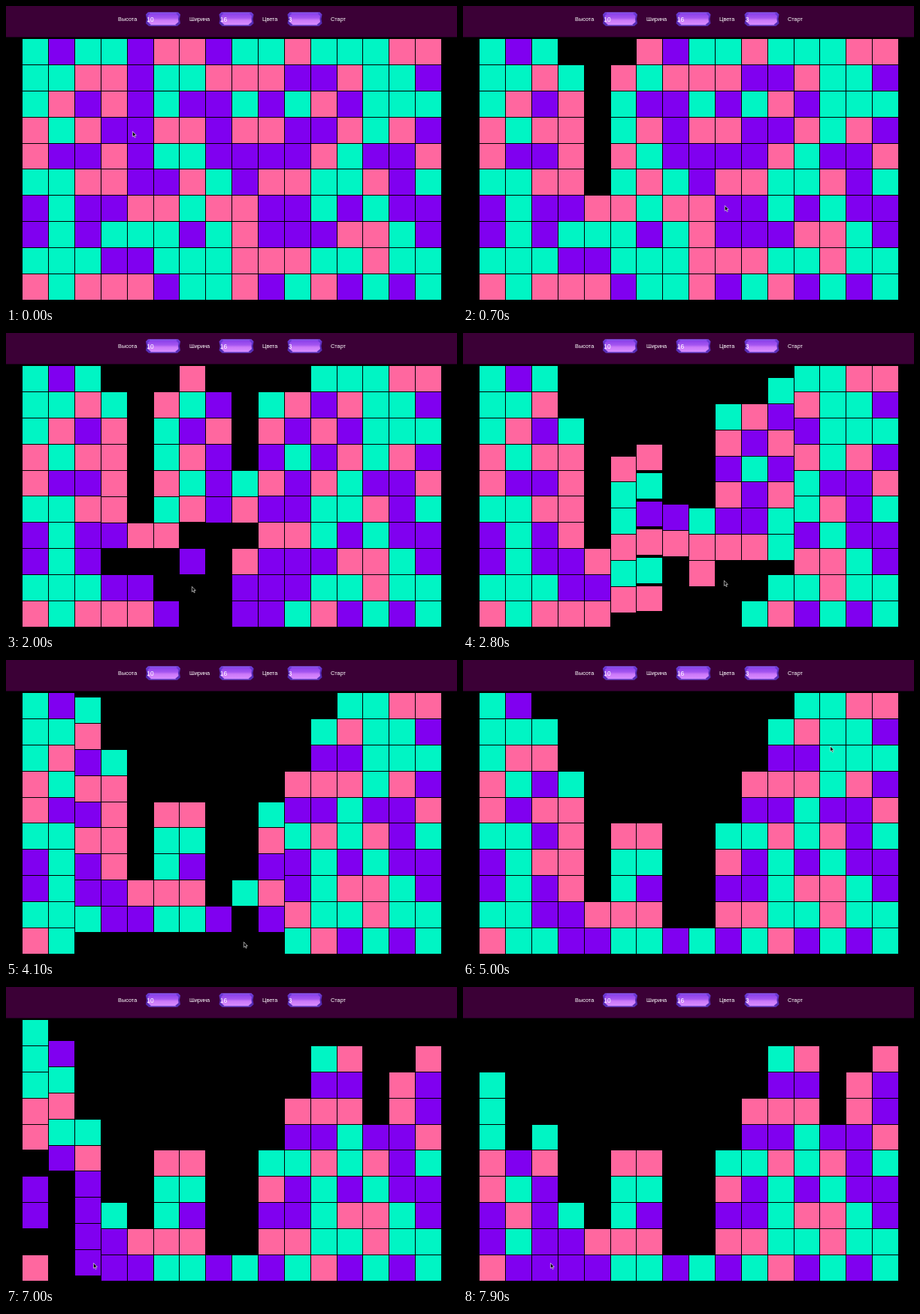
Write an HTML page that moves like this. It is 600x399 px and loops after 8000 ms.

```html
<!DOCTYPE html>
<html lang="ru">
<head>
<meta charset="utf-8">
<style>
  html, body { margin: 0; width: 100%; height: 100%; overflow: hidden; background: #000; }
  svg { display: block; width: 600px; height: 399px; }
  text { font-family: "Liberation Sans", Arial, sans-serif; fill: #fff; }
  .label { font-size: 7.35px; }
  .value { font-size: 8.4px; }
</style>
</head>
<body>
<svg viewBox="0 0 600 399">
  <defs>
    <linearGradient id="rim" x2="0" y2="1">
      <stop offset="0" stop-color="#7440e0"/>
      <stop offset=".5" stop-color="#4f26b0"/>
      <stop offset="1" stop-color="#5a30b8"/>
    </linearGradient>
    <linearGradient id="gem" x2="0" y2="1">
      <stop offset="0" stop-color="#8a40ea"/>
      <stop offset=".4" stop-color="#a455f0"/>
      <stop offset=".6" stop-color="#cb78f8"/>
      <stop offset="1" stop-color="#d88cff"/>
    </linearGradient>
    <g id="field">
      <path d="M3 0H43L46 3L45 9L46 15L42 18.5H4L0 15L1 9L0 3Z" fill="url(#rim)"/>
      <path d="M6 1.6H40L43.5 5L43 9L43.5 13L39 16.6H7L2.5 13L3 9L2.5 5Z" fill="url(#gem)"/>
      <path d="M5 .9H41M6 17.4H40" stroke="#b488ff" stroke-width=".7" opacity=".7"/>
    </g>
  </defs>
  <rect width="600" height="399"/>
  <rect width="600" height="41.5" fill="#3b0036"/>
  <g id="header"></g>
  <g id="board" shape-rendering="crispEdges"></g>
  <path id="cursor" d="M.4 .4V7.4L2 6L3.2 8.6L4.3 8.1L3.1 5.5H5.3Z" fill="#000" stroke="#fff" stroke-width=".6"/>
</svg>
<script>
const LOOP = 8000, STEP = 100;
const CELL = 34.86, LEFT = 21.8, TOP = 43.6;
const SPEED = 0.187 / CELL; // rows per ms
const COLORS = { T: '#00f5c4', V: '#8000f0', P: '#ff679f' };
const ROWS = [
  'TVTTVPPVTTPTTTPP',
  'TTPPVTTPPPVVPTTV',
  'TPVPVTVVTVTPVTTT',
  'PTPVVPPVPPVVPTPV',
  'PVVPVTTVVVVPTVVP',
  'TTPPVVPTVPPTTPVT',
  'VTVVPPTPPVVTVTVV',
  'VTVTTTVTPVVVPPTV',
  'TTTVVTTTPPPTTPTT',
  'PTPPPVTTPVTPVTVT'
];
// time, row, column
const CLICKS = [
  [512, 3, 4], [1250, 8, 8], [1998, 8, 6], [2715, 8, 9],
  [4068, 9, 8], [5200, 1, 13], [6230, 6, 3], [6850, 9, 2]
];
// time, x, y
const POINTER = [
  [0, 168, 167], [512, 168, 167], [700, 348, 266], [1100, 318, 338], [1260, 318, 338],
  [1750, 247, 338], [2050, 247, 338], [2600, 347, 330], [2850, 347, 330],
  [3900, 316, 376], [4200, 316, 376], [5050, 490, 112], [5300, 490, 112],
  [6100, 145, 264], [6300, 145, 264], [6750, 116, 368], [8000, 116, 368]
];

function add(parent, name, attrs, text = '') {
  const el = document.createElementNS('http://www.w3.org/2000/svg', name);
  for (const key in attrs) el.setAttribute(key, attrs[key]);
  el.textContent = text;
  return parent.appendChild(el);
}

// start and length of a tile along one axis, leaving a one-pixel grid line
function span(edge) {
  const start = Math.floor(edge) + 1;
  return [start, Math.floor(edge + CELL) - start];
}

const header = document.getElementById('header');
[['Высота', 149], ['Ширина', 244], ['Цвета', 341], ['Старт', 432]].forEach(([text, x]) =>
  add(header, 'text', { x, y: 20, class: 'label' }, text));
[['10', 186], ['16', 283.5], ['3', 374.5]].forEach(([text, x]) => {
  add(header, 'use', { href: '#field', x, y: 8.3 });
  add(header, 'text', { x: x + 1.3, y: 20.6, class: 'value' }, text);
});

const board = document.getElementById('board');
const cursor = document.getElementById('cursor');
const tiles = [];
const columns = [...ROWS[0]].map((_, col) => ROWS.map((line, row) => {
  const tile = { row, color: line[col], falls: [], gone: Infinity };
  const [x, width] = span(LEFT + col * CELL);
  tile.el = add(board, 'rect', { x, width, fill: COLORS[tile.color] });
  tiles.push(tile);
  return tile;
}));

function removeGroup(row, col, color, time) {
  const tile = columns[col]?.[row];
  if (!tile || tile.color !== color || tile.gone <= time) return;
  tile.gone = time;
  removeGroup(row - 1, col, color, time);
  removeGroup(row + 1, col, color, time);
  removeGroup(row, col - 1, color, time);
  removeGroup(row, col + 1, color, time);
}

function settle(column, time) {
  const next = Array(column.length).fill(null);
  const moving = [];
  let gap = 0;
  for (let row = column.length - 1; row >= 0; row--) {
    const tile = column[row];
    if (!tile) continue;
    if (tile.gone <= time) { gap++; continue; }
    next[row + gap] = tile;
    if (gap) moving.push({ tile, gap });
  }
  // columns with separate holes drop raggedly, lower tiles first
  const split = moving.some(m => m.gap !== moving[0].gap);
  moving.forEach(({ tile, gap }, i) => {
    const last = tile.falls.at(-1);
    const ready = time + (split ? 150 + 15 * i : 0);
    const start = Math.max(ready, last ? last.start + last.gap / SPEED : 0);
    tile.falls.push({ start, gap });
  });
  return next;
}

for (const [time, row, col] of CLICKS) {
  removeGroup(row, col, columns[col][row].color, time);
  columns.forEach((column, i) => { columns[i] = settle(column, time); });
}

function pointerAt(t) {
  const i = POINTER.findIndex(p => p[0] > t);
  const [t0, x0, y0] = POINTER[i - 1], [t1, x1, y1] = POINTER[i];
  const k = (t - t0) / (t1 - t0), e = k * k * (3 - 2 * k);
  return [x0 + (x1 - x0) * e, y0 + (y1 - y0) * e];
}

function draw(t) {
  for (const { el, row, falls, gone } of tiles) {
    el.style.display = t < gone ? '' : 'none';
    const drop = falls.reduce((sum, f) =>
      sum + Math.min(f.gap, Math.max(0, (t - f.start) * SPEED)), 0);
    const [y, height] = span(TOP + (row + drop) * CELL);
    el.setAttribute('y', y);
    el.setAttribute('height', height);
  }
  cursor.setAttribute('transform', `translate(${pointerAt(t)})`);
}

const begin = performance.now();
function tick() {
  const elapsed = performance.now() - begin + 15;
  draw(Math.floor(elapsed % LOOP / STEP) * STEP);
  requestAnimationFrame(tick);
}
tick();
</script>
</body>
</html>
```
